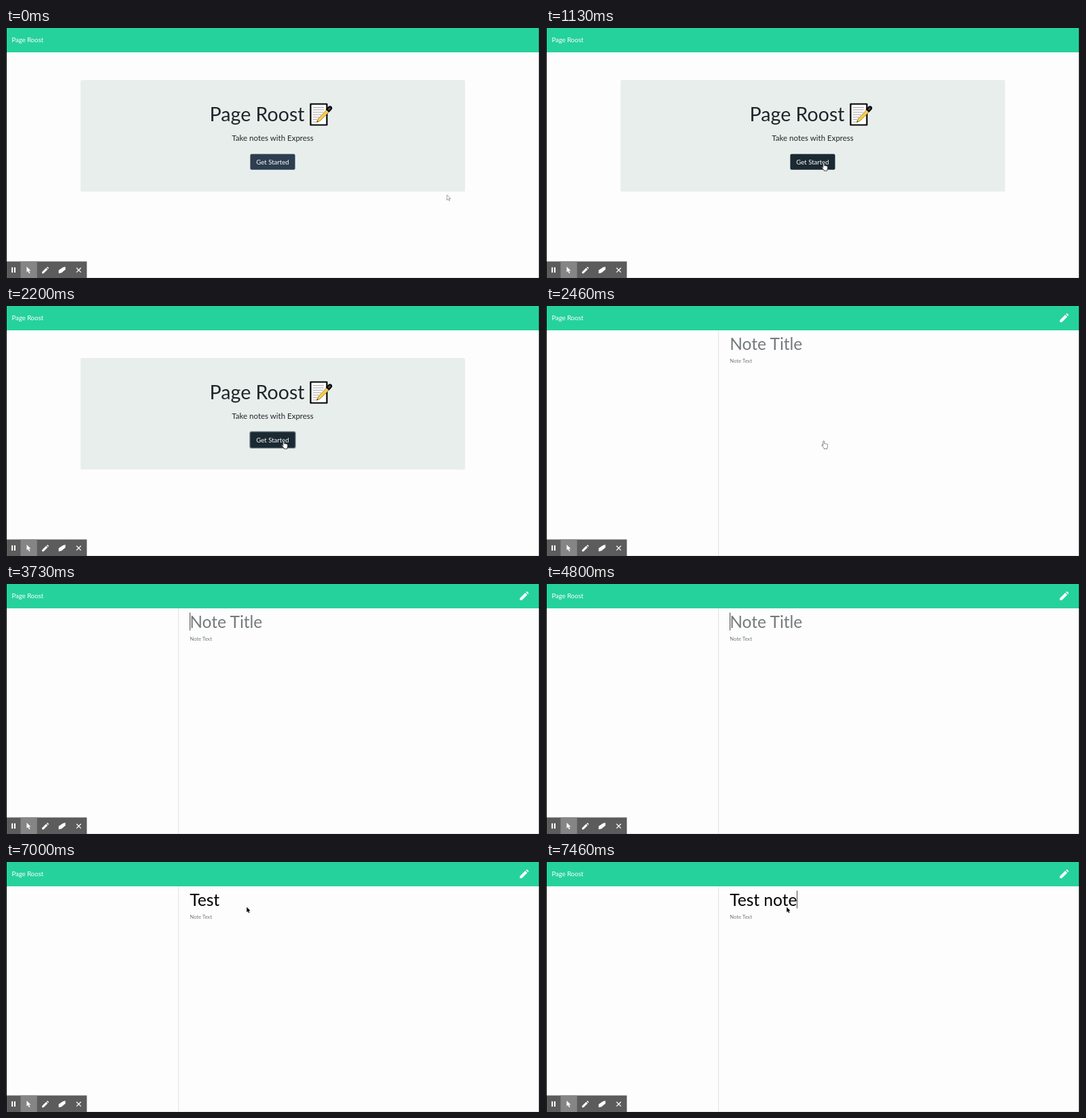
Animation, 788 px wide and 370 px high, one loop 8000 ms. Source, as an HTML page:

```html
<!DOCTYPE html>
<html lang="en">
<head>
<meta charset="utf-8">
<title>Page Roost</title>
<style>
  html, body { margin: 0; width: 100%; height: 100%; overflow: hidden; background: #fdfdfd; }
  svg { display: block; width: 788px; height: 370px; }
  text { font-family: Lato, sans-serif; white-space: pre; }
  .mid { text-anchor: middle; }
  .hint { fill: #747a7c; }
</style>
</head>
<body>
<svg viewBox="0 0 788 370">
  <defs>
    <path id="pencil" d="M0 13V10L8 2l3 3-8 8ZM8.9 1.1l.7-.7q.8-.8 1.6 0l1.4 1.4q.8.8 0 1.6l-.7.7Z"/>
    <path id="arrow" d="M0 0V7.6L1.8 6 3 8.7 4.2 8.1 3.1 5.5H5.4Z"/>
    <path id="hand" d="M2.6 7.6V1.6q0-1.1 1-1.1t1 1.1V4.6q1.2-.6 1.7.2 1.2-.5 1.6.4 1.5-.3 1.5 1.1V8.5q0 1.4-.8 2.3V12.2H4V11Q2.5 9.4.9 7.4q-.5-1 .3-1.3.7-.2 1.4 1.5Z"/>
  </defs>

  <rect width="788" height="370" fill="#fdfdfd"/>
  <rect width="788" height="36" fill="#26d29c"/>
  <text x="8.4" y="21.3" font-size="9.58" fill="#fff">Page Roost</text>

  <g id="home">
    <rect x="110" y="77" width="567.5" height="165.3" rx="2.5" fill="#e8eeec"/>
    <text x="300.6" y="137.7" font-size="28.6" fill="#212529">Page Roost</text>
    <g stroke="#000" stroke-linejoin="round">
      <path d="M449.5 112.5H473.5V143.5H449.5Z" fill="#fff" stroke-width="2.2"/>
      <path d="M453 117.5h16m-16 3.6h16m-16 3.6h15m-15 3.6h12m-12 3.6h9m-9 3.6h6m-6 3.6h5" stroke="#a29a9b" stroke-width=".9"/>
      <path d="M458.5 139.5 460.7 134.2 473.5 120.7 476.9 124 463.7 137.3Z" fill="#f5cd46" stroke="#7c6420" stroke-width=".7"/>
      <path d="M458.5 139.5 459.4 137.2 460.8 138.6Z" fill="#222" stroke="none"/>
      <path d="M473.3 120.4 476.5 117q1.8-1.6 3.2 0t0 3.2L476.6 123.6Z" fill="#4d4d4d" stroke-width="2"/>
    </g>
    <text class="mid" x="393.6" y="167.2" font-size="11.5" fill="#212529">Take notes with Express</text>
    <rect id="ring" x="359.2" y="185.2" width="68.6" height="25.8" rx="3" fill="#7f9099"/>
    <rect id="button" x="360.4" y="186.4" width="66.2" height="23.4" rx="2"/>
    <text class="mid" x="393.5" y="201.5" font-size="9.58" fill="#fff">Get Started</text>
  </g>

  <g id="notes">
    <use href="#pencil" x="758.2" y="11" fill="#fff"/>
    <path d="M254.6 36V370" stroke="#dfe2e4"/>
    <text id="hint" class="hint" x="271.3" y="64.6" font-size="24.5">Note Title</text>
    <text id="typed" x="271.3" y="64.6" font-size="24.5" fill="#000"></text>
    <rect id="caret" y="42.3" width=".9" height="26.4" fill="#333"/>
    <text class="hint" x="271.3" y="84.4" font-size="7.67">Note Text</text>
  </g>

  <path d="M0 369.6H788" stroke="#dedede" stroke-width=".8"/>
  <path d="M0 0H1V370H0ZM786.5 0H788V370H786.5Z"/>

  <g fill="#fff">
    <rect x="1" y="345.5" width="118.3" height="24.5" fill="#5c5c5c"/>
    <rect x="21.5" y="345.5" width="24.3" height="24.5" fill="#858585"/>
    <path d="M8.2 354.3h2v7.6h-2ZM12 354.3h2v7.6h-2Z"/>
    <path d="M30.5 353.3V361.4L32.4 359.7 34 363.3 35.5 362.6 33.9 359.2H36.7Z"/>
    <use href="#pencil" transform="translate(53.2 353.4) scale(.76)"/>
    <path d="M77.7 358.6 84 354.2 87.7 353.3V357.6L82 362.2 77.7 363.3Z"/>
    <path d="M104 355l6.6 6.6m0-6.6-6.6 6.6" stroke="#fff" stroke-width="1.3"/>
  </g>

  <use id="arrowCursor" href="#arrow" stroke-width=".6"/>
  <use id="handCursor" href="#hand" fill="#fff" stroke-width=".8"/>
</svg>
<script>
const LOOP = 8000;
const $ = id => document.getElementById(id);
const show = (id, on) => $(id).setAttribute('display', on ? 'inline' : 'none');
const place = (id, x, y) => $(id).setAttribute('transform', `translate(${x} ${y})`);

// Each table holds [start ms, value]; the last started entry applies.
const TYPING = [[0, ''], [6000, 'T'], [6130, 'Te'], [6330, 'Tes'], [6460, 'Test'],
  [7130, 'Test '], [7200, 'Test n'], [7260, 'Test no'], [7400, 'Test not'], [7460, 'Test note']];
const CARET = [[0, 0], [3730, 1], [4260, 0], [4800, 1], [5330, 0], [5860, 1], [7000, 0], [7130, 1]];
const at = (table, t) => table.reduce((value, [start, next]) => t >= start ? next : value, table[0][1]);

function pointer(t) {
  if (t >= 1130) return [406.2, 199.2];
  const step = t < 60 ? 0 : Math.min(8, Math.floor((t - 60) / 67) + 1);
  const p = 0.5 - Math.cos(Math.PI * step / 8) / 2;
  return [650.7 - 244.2 * p, 247 - 42 * p];
}

function draw(t) {
  const home = t < 2460;
  const [x, y] = pointer(t);
  const hover = x < 424;
  show('home', home);
  show('notes', !home);

  $('button').setAttribute('fill', hover ? '#1a2932' : '#2c3e50');
  show('ring', t >= 2130);
  $('ring').setAttribute('opacity', t < 2200 ? 0.5 : 1);

  const late = t >= 5330;
  show('handCursor', hover && t < 3060);
  place('handCursor', x, y);
  $('handCursor').setAttribute('stroke', home ? '#222' : '#666');
  show('arrowCursor', !hover || late);
  place('arrowCursor', late ? 355.2 : x, late ? 66.8 : y);
  $('arrowCursor').setAttribute('fill', late ? '#000' : '#fff');
  $('arrowCursor').setAttribute('stroke', late ? 'none' : '#666');

  const text = at(TYPING, t);
  const typed = $('typed');
  if (typed.textContent !== text) typed.textContent = text;
  show('hint', !text);
  show('caret', at(CARET, t));
  $('caret').setAttribute('x', 271 + (text && !home ? typed.getComputedTextLength() : 0));
}

const begin = performance.now();
function frame() {
  draw((performance.now() - begin) % LOOP);
  requestAnimationFrame(frame);
}
frame();
</script>
</body>
</html>
```
